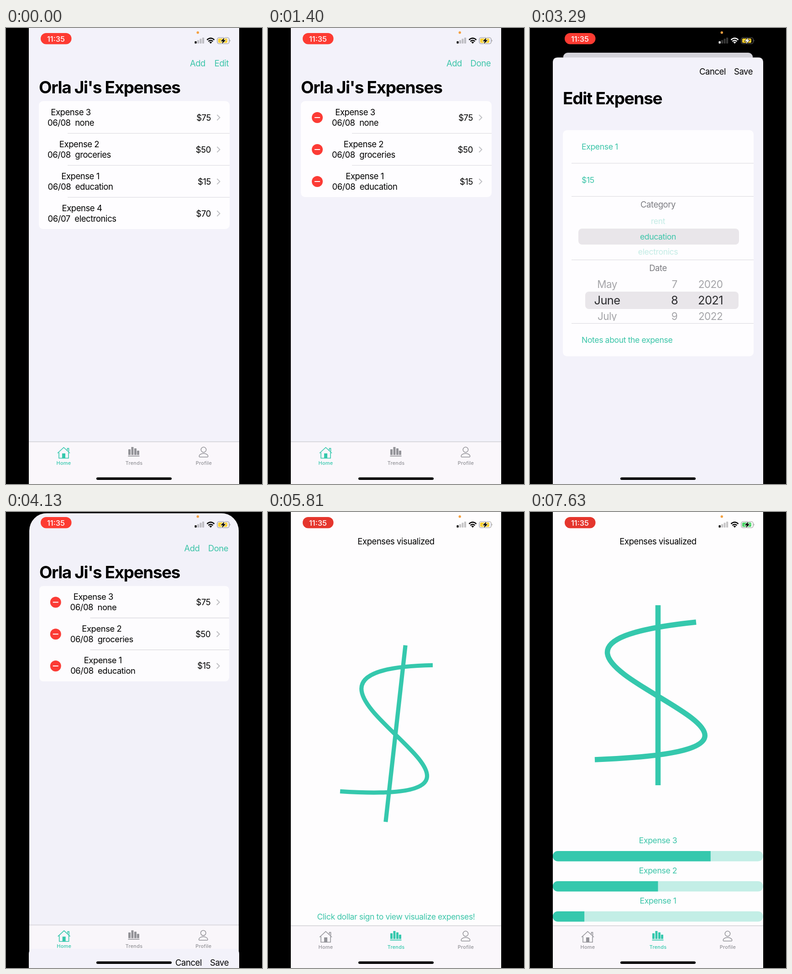
Recreate the animation shown at these times as an HTML page. Size 561 px wide and 998 px high, loop 7.7 s.

```html
<!DOCTYPE html>
<html lang="en">
<head>
<meta charset="utf-8">
<title>Expense tracker demo</title>
<style>
  html, body { margin: 0; width: 100%; height: 100%; overflow: hidden; background: #000; }
  svg { display: block; width: 100%; height: 100%; }
  text { font: 18.5px Inter, Roboto, sans-serif; letter-spacing: -.024em; white-space: pre; }
  .title { font-size: 37px; font-weight: 700; letter-spacing: -.036em; }
  .tab { font-size: 11px; font-weight: 500; letter-spacing: .02em; }
  .clock { font-size: 16.5px; font-weight: 500; letter-spacing: 0; }
  .banner { font-size: 17px; }
  .field { font-size: 17.7px; }
  .wheel { font-size: 22.5px; }
  .picked { font-size: 25.5px; }
  .mid { text-anchor: middle; }
  .end { text-anchor: end; }
  .green { fill: #3cc5a9; }
  .gray { fill: #7c7c81; }
  .pale { fill: #a4a4a8; }
  .dark { fill: #2b2b2e; }
  .line { stroke: #d9d8dd; stroke-width: 1.2; }
</style>
</head>
<body>
<svg id="stage" viewBox="0 0 561 998"></svg>
<script>
const LOOP = 7700, GREEN = '#35c8ad', GRAY = '#939398';
const stage = document.getElementById('stage');

const text = (x, y, str, cls = '') => `<text x="${x}" y="${y}" class="${cls}">${str}</text>`;
const rect = (x, y, w, h, fill, r = 0, extra = '') =>
  `<rect x="${x}" y="${y}" width="${w}" height="${h}" fill="${fill}" rx="${r}" ${extra}/>`;
const line = (x1, x2, y) => `<path class="line" d="M${x1} ${y}H${x2}"/>`;
const each = (list, draw) => list.map(draw).join('');

const expenses = [
  ['Expense 3', '06/08  none', '$75', 142],
  ['Expense 2', '06/08  groceries', '$50', 160.5],
  ['Expense 1', '06/08  education', '$15', 163],
  ['Expense 4', '06/07  electronics', '$70', 166.5]
];
const bars = [['Expense 3', .75], ['Expense 2', .5], ['Expense 1', .15]];

const row = ([name, detail, amount, cx], i) => {
  const y = 160 + 70 * i;
  return `<g class="row">
    <g class="shift">
      ${i ? line(135, 490, y + .5) : ''}
      ${text(cx, y + 30.5, name, 'mid')}${text(cx, y + 53.5, detail, 'mid')}
      <g class="minus"><circle cx="59" cy="${y + 36}" r="12" fill="#fc3b35"/>
        <path d="M53 ${y + 36}h12" stroke="#fff" stroke-width="2"/></g>
    </g>
    ${text(449, y + 42.5, amount, 'end')}
    <path d="M462.500 ${y + 30}l6 6-6 6" fill="none" stroke="#c0c0c4" stroke-width="2"/>
  </g>`;
};

const home = `
  ${rect(50, 0, 461, 998, '#f3f2fa')}
  ${text(437, 84, 'Add', 'green end" id="add')}${text(488, 84, 'Edit', 'green end" id="edit')}
  ${text(72, 143, "Orla Ji's Expenses", 'title')}
  <g clip-path="url(#listClip)">${rect(72, 160, 418, 280, '#fefdff')}${each(expenses, row)}</g>`;

const trends = `
  ${rect(50, 0, 461, 998, '#fefdfe')}
  ${text(280.5, 71, 'Expenses visualized', 'mid')}
  <path id="dollar" fill="none" stroke="${GREEN}"/>
  ${text(280.5, 892, 'Click dollar sign to view visualize expenses!', 'mid green field" id="hint')}
  <g id="bars">${each(bars, ([name, share], i) => {
    const y = 742 + 66 * i;
    return text(280.5, y - 17.5, name, 'mid green field') +
      rect(50, y, 461, 22.500, '#c3eee6', 11.25) +
      `<path d="M${50 + 461 * share} ${y}H61a11.250 11.250 0 0 0 0 22.500H${50 + 461 * share}z" fill="${GREEN}"/>`;
  })}</g>`;

const tabs = `
  ${rect(50, 905, 461, 93, '#faf7fb')}
  <path d="M50 905.500H511" stroke="#cfced3" stroke-width="1.300"/>
  <g id="homeTab"><path d="M113 930.500L126.500 918l13.500 12.500M116 929v12.500h21V929M134.500 924v-4h3v7" fill="none" stroke="currentColor" stroke-width="1.600"/>
    ${rect(123, 931, 7, 11, 'currentColor')}${text(126.5, 956, 'Home', 'tab mid" fill="currentColor')}</g>
  <g id="trendsTab">${each([[268, 922], [274.5, 917], [281, 920], [287, 925]],
    ([x, y]) => rect(x, y, 5, 934.5 - y, 'currentColor', .5))}${rect(267.500, 936, 25, 1.700, 'currentColor')}
    ${text(280.5, 956, 'Trends', 'tab mid" fill="currentColor')}</g>
  <g color="${GRAY}"><g fill="none" stroke="currentColor" stroke-width="1.500"><circle cx="433" cy="923" r="5.700"/>
    <path d="M425 939C422 939 423 934 427 932.500Q433 930 439 932.500C443 934 444 939 441 939z"/></g>
    ${text(433.5, 956, 'Profile', 'tab mid" fill="currentColor')}</g>`;

const wheelRow = (y, month, day, year, cls) =>
  text(169, y, month, cls) + text(316.5, y, day, cls) + text(395.5, y, year, cls);

const sheet = `
  <path d="M50 998V75.500q0-11 11-11H500q11 0 11 11V998z" fill="#f3f2fa"/>
  ${text(429, 102, 'Cancel', 'end')}${text(488, 102, 'Save', 'end')}
  ${text(72, 167, 'Edit Expense', 'title')}
  ${rect(72, 223.500, 418, 495, '#fefdff', 9)}
  ${text(113, 266, 'Expense 1', 'green field')}${text(113, 338.5, '$15', 'green field')}
  ${text(280.5, 393, 'Category', 'mid gray')}
  ${rect(106, 439, 352, 35, '#e9e6ea', 8)}
  <g opacity=".3">${text(280.5, 429, 'rent', 'mid green field')}${text(280.5, 496, 'electronics', 'mid green field')}</g>
  ${text(280.5, 463, 'education', 'mid green field')}
  ${text(280.5, 532, 'Date', 'mid gray')}
  ${rect(121, 577, 336, 38, '#e9e6ea', 8)}
  ${wheelRow(569, 'May', 7, 2020, 'mid pale wheel')}
  ${wheelRow(605, 'June', 8, 2021, 'mid dark picked')}
  ${wheelRow(639, 'July', 9, 2022, 'mid pale wheel')}
  ${rect(91, 641, 390, 5, '#fefdff')}
  ${each([296, 368.5, 507.5, 646.5], y => line(91, 490, y))}
  ${text(113, 689, 'Notes about the expense', 'green field')}`;

const status = `
  ${rect(76, 11, 67.500, 24.500, '#fd3b32', 12, 'id="pill"')}
  ${text(109.5, 29.5, '11:35', 'clock mid" fill="#fff')}
  <g id="icons">
    ${each([5, 7.5, 10.5, 13], (h, i) => rect(413.5 + 5.5 * i, 34 - h, 4.2, h, 'currentColor', 1, i ? 'opacity=".22"' : ''))}
    <g fill="none" stroke="currentColor" stroke-width="2.500"><path d="M440.500 26q8-7.500 16 0M443.500 29.200q5-4.500 10 0"/></g>
    <path d="M445.500 31.200q3-2.400 6 0l-3 3z" fill="currentColor"/>
    <rect x="463" y="21" width="26" height="13.500" rx="4" fill="none" stroke="currentColor" stroke-opacity=".4" stroke-width="1.200"/>
    <path d="M490.500 25.500q2 2.200 0 4.500z" fill="currentColor" opacity=".5"/>
    ${rect(465, 23, 20, 9.500, '#fbd02e', 2, 'id="charge"')}
    <path id="bolt" d="M478.500 21l-8 8h4.500l-2 6 8.500-8.500h-4.500z" fill="currentColor" paint-order="stroke" stroke-width="1.600"/>
  </g>`;

stage.innerHTML = `
  <defs>
    <clipPath id="frame">${rect(50, 0, 461, 998, '#000')}</clipPath>
    <clipPath id="device">${rect(50, 0, 461, 998, '#000', 0, 'id="deviceRect"')}</clipPath>
    <clipPath id="listClip">${rect(72, 160, 418, 280, '#000', 9, 'id="listRect"')}</clipPath>
    <linearGradient id="glass"><stop stop-color="#f8d8d5"/><stop offset=".15" stop-color="#f8d0cc"/>
      <stop offset=".32" stop-color="#f4f1f4"/><stop offset="1" stop-color="#f3f1f4"/></linearGradient>
  </defs>
  <rect width="561" height="998"/>
  <g clip-path="url(#frame)">
    <g id="screen" clip-path="url(#device)">
      <g id="home">${home}</g><g id="trends">${trends}</g>${tabs}
      ${rect(50, 0, 461, 998, '#000', 0, 'id="dim"')}
    </g>
    <g id="sheet">${sheet}</g>
    ${status}
    <g id="banner">${rect(50, -76, 461, 76, 'url(#glass)', 8)}${text(73, -16, 'Battery sufficiently charged.', 'banner dark')}</g>
    <circle cx="420.300" cy="10" r="2.700" fill="#f5a040"/>
    ${rect(198, 983.500, 165, 5.500, '#000', 2.750)}
  </g>`;

const $ = id => document.getElementById(id);
const all = cls => [...stage.querySelectorAll('.' + cls)];
const shifts = all('shift'), minuses = all('minus'), lastRow = all('row')[3];
const set = (el, attrs) => { for (const k in attrs) el.setAttribute(k, attrs[k]); };
const show = (el, on) => { el.style.display = on ? '' : 'none'; };
const lerp = (a, b, p) => a + (b - a) * p;

// Eased 0..1 progress of a move beginning at `start`
const ease = (t, start, duration) => {
  const x = Math.min(1, Math.max(0, (t - start) / duration));
  return x < .5 ? 4 * x ** 3 : 1 - 4 * (1 - x) ** 3;
};

function drawList(t) {
  const editing = ease(t, 450, 300) - ease(t, 4480, 300);
  const removed = ease(t, 1060, 280);
  shifts.forEach(g => set(g, { transform: `translate(${49 * editing})` }));
  minuses.forEach(g => set(g, { opacity: editing }));
  $('edit').textContent = editing > .5 ? 'Done' : 'Edit';
  set($('add'), { x: editing > .5 ? 425 : 437 });
  set(lastRow, { opacity: 1 - removed });
  set($('listRect'), { height: 280 - 70 * removed });
}

function drawSheet(t) {
  const up = ease(t, 2000, 480) - ease(t, 3700, 555);
  const scale = 1 - .098 * up;
  set($('screen'), { transform: `translate(280.5 ${499 + 5 * up}) scale(${scale}) translate(-280.5 -499)` });
  set($('deviceRect'), { rx: up > 0 ? 40 - 28 * up : 0 });
  set($('dim'), { opacity: .13 * up });
  set($('sheet'), { transform: `translate(0 ${933 * (1 - up)})` });
  show($('sheet'), up > 0);
  set($('icons'), { color: up > .5 ? '#fff' : '#000' });
  set($('bolt'), { stroke: up > .5 ? '#000' : '#fff' });
}

// The sign widens, straightens and thickens while the bars slide in
function drawTrends(t) {
  const slide = ease(t, 6296, 900);
  const sx = lerp(.77, 1, slide), sy = lerp(.987, 1, slide);
  const at = (x, y) => `${x * sx} ${y * sy} `;
  set($('dollar'), {
    d: `M${at(0, -197)}L${at(0, 197)}M${at(83.5, -160)}C${at(-525, -97)}${at(553, 115)}${at(-138.5, 141)}`,
    'stroke-width': lerp(9.2, 11.5, slide),
    transform: `translate(${lerp(279.5, 280.5, slide)} ${lerp(485, 401, slide)}) rotate(${lerp(6.4, 0, slide)})`
  });
  set($('hint'), { opacity: 1 - slide });
  set($('bars'), { transform: `translate(${461 * (1 - slide)})` });
  show($('bars'), slide > 0);
}

function render(t) {
  const onTrends = t >= 5600;
  show($('home'), !onTrends);
  show($('trends'), onTrends);
  set($('homeTab'), { color: onTrends ? GRAY : GREEN });
  set($('trendsTab'), { color: onTrends ? GREEN : GRAY });
  set($('pill'), { fill: onTrends ? '#e5362d' : '#fd3b32' });
  drawList(t);
  drawSheet(t);
  drawTrends(t);
  const shown = ease(t, 5950, 180) - ease(t, 6300, 249);
  set($('banner'), { transform: `translate(0 ${-2 + 78 * shown})` });
  show($('banner'), shown > 0);
  set($('charge'), { fill: t < 6400 ? '#fbd02e' : t < 6510 ? '#c5d62f' : '#4fd46a' });
}

function tick() {
  render(performance.now() % LOOP);
  requestAnimationFrame(tick);
}
tick();
</script>
</body>
</html>
```
